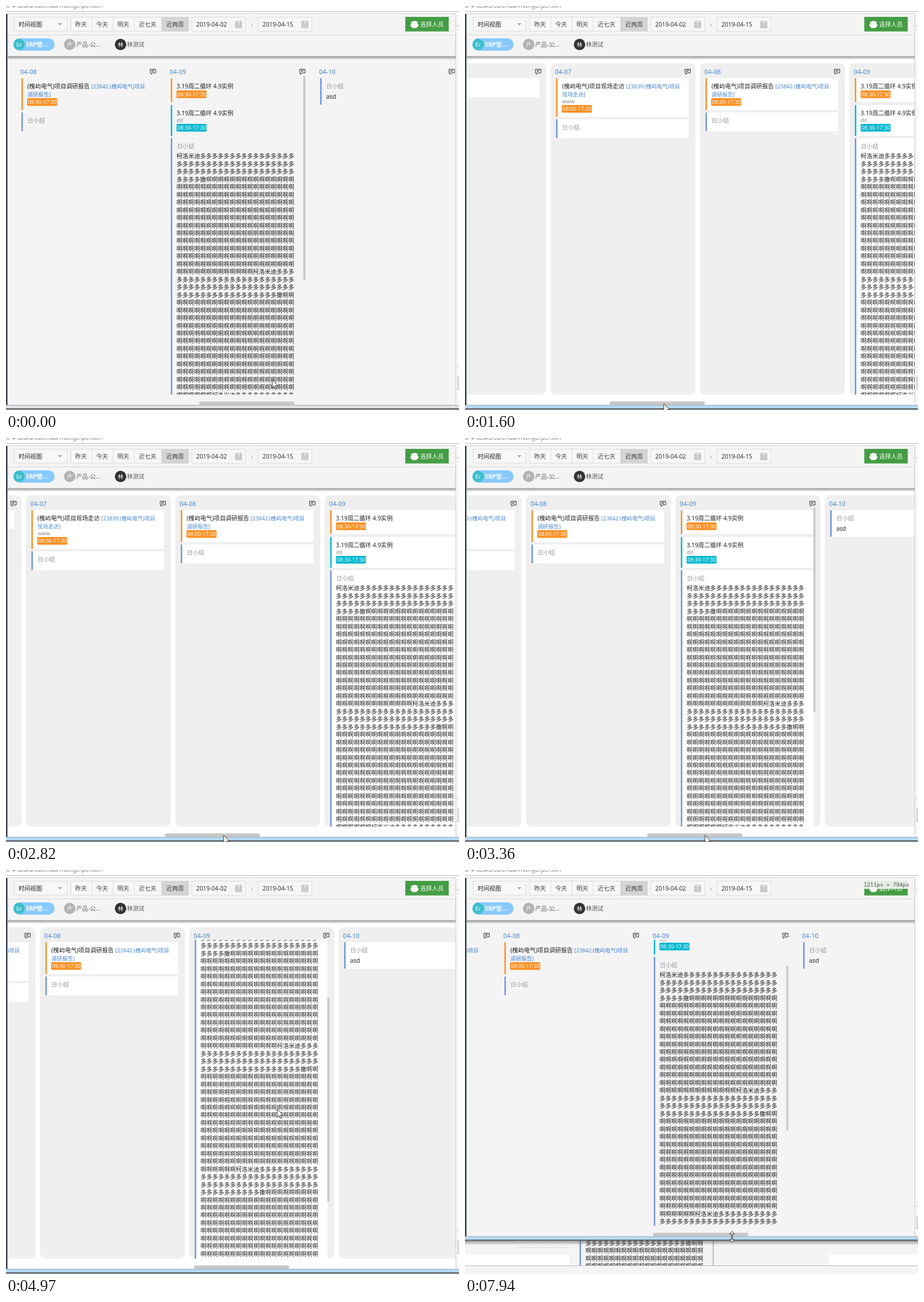
An HTML page that plays this animation: 793x706 px, repeating every 8 s.

```html
<!DOCTYPE html>
<html lang="zh-CN">
<head>
<meta charset="utf-8">
<title>日程视图</title>
<style>
  html, body { margin: 0; width: 100%; height: 100%; overflow: hidden; background: #fff; }
  svg { display: block; --page: #fff; --col: #efefef; --card: #fff; --edge: #b5d8f3; }
  svg.flat { --page: #f4f4f4; --col: #f4f4f4; --card: #f4f4f4; }
  svg.idle { --edge: #dfe1e3; }
  text { font-family: "Noto Sans", "Noto Sans CJK SC", "Noto Sans CJK JP", sans-serif; white-space: pre; }
  .page { fill: var(--page); }
  .col { fill: var(--col); }
  .card { fill: var(--card); }
  .edge { fill: var(--edge); }
</style>
</head>
<body>
<script>
const W = 793, H = 706, LOOP = 8000;
const SIZE = 10.3, SMALL = 9.4, ROW = 13.46, COL_STEP = 261.5;
const ORANGE = '#fb9023', TEAL = '#00b8cf', BLUE = '#6e96dc', LINK = '#4586d0';

function add(parent, tag, attrs = {}, content) {
  const node = document.createElementNS('http://www.w3.org/2000/svg', tag);
  for (const key in attrs) node.setAttribute(key, attrs[key]);
  if (content !== undefined) node.textContent = content;
  parent.appendChild(node);
  return node;
}
const group = (p, attrs) => add(p, 'g', attrs);
const rect = (p, x, y, width, height, fill, more) =>
  add(p, 'rect', { x, y, width, height, fill, ...more });
const path = (p, d, more) => add(p, 'path', { d, fill: 'none', ...more });
// y is the visual middle of the line
const text = (p, x, y, str, fill = '#222', size = SIZE, more) =>
  add(p, 'text', { x, y: y + size * 0.38, fill, 'font-size': size, ...more }, str);
const move = (node, x, y) => node.setAttribute('transform', `translate(${x} ${y})`);

const svg = add(document.body, 'svg', { width: W, height: H, viewBox: `0 0 ${W} ${H}` });
const defs = add(svg, 'defs');
const clip = (id, x, y, w, h) => rect(add(defs, 'clipPath', { id }), x, y, w, h);
const shade = add(defs, 'linearGradient', { id: 'shade', x2: 0, y2: 1 });
add(shade, 'stop', { offset: 0, 'stop-color': '#555', 'stop-opacity': 0.6 });
add(shade, 'stop', { offset: 1, 'stop-color': '#555', 'stop-opacity': 0 });

// Long repeating note, wrapped at 20 characters
const unit = '柯洛米迪' + '多'.repeat(60) + '撒' + '啊'.repeat(248);
const note = unit.repeat(4).slice(0, 1080);
function noteRows(p, x, y, first, count) {
  for (let i = 0; i < count; i++) {
    const from = (first + i) * 20;
    text(p, x, y + i * ROW, note.slice(from, from + 20));
  }
}

function drawBehind() {
  const g = group(svg);
  rect(g, 0, 600, W, 106, '#f4f4f4');
  rect(g, 0, 672, 183, 19, '#fff');
  rect(g, 637, 672, 156, 19, '#fff');
  rect(g, 93, 659, 90, 1, '#ddd');
  clip('behind', 190, 600, 260, 91);
  const c = group(g, { 'clip-path': 'url(#behind)' });
  rect(c, 200.5, 600, 2.5, 91, BLUE);
  rect(c, 433, 600, 3, 91, '#ccc');
  noteRows(c, 211, 652, 18, 4);
  rect(g, 0, 691, W, 1, '#bdbdbd');
}

function card(p, y, h, color) {
  rect(p, 3, y, 231, h, null, { class: 'card' });
  rect(p, 2, y, 2.5, h, color, { rx: 1 });
}
function badge(p, y, str, color) {
  rect(p, 12, y, 52.5, 13.5, color, { rx: 2 });
  text(p, 13.5, y + 6.7, str, '#fff', 9.2);
}
function summary(p, y, h) {
  card(p, y, h, BLUE);
  text(p, 12.5, y + 14, '日小结', '#999', SIZE, { 'font-weight': 500 });
}
function column(index, date) {
  const g = group(columns, { transform: `translate(${index * COL_STEP} 0)` });
  rect(g, -7.5, 100, 253.5, 579, null, { class: 'col', rx: 9 });
  text(g, 0, 115, date, LINK, 11);
  path(g, 'M227.5 110.5h9.5v6.5h-5.5l-2.5 2.5v-2.5h-1.5zM229.5 112.7h5.5M229.5 114.8h4',
    { stroke: '#333' });
  return g;
}
function visit(p, h, name, id, tail) {
  card(p, 126, h, ORANGE);
  const line = text(p, 12.5, 140, '');
  add(line, 'tspan', {}, `(槐屿电气)${name} `);
  add(line, 'tspan', { fill: LINK, 'font-size': SMALL }, `[${id}:(槐屿电气)项目`);
  text(p, 12.5, 154, tail, LINK, SMALL);
}

drawBehind();
const pageBack = rect(svg, 0, 13, W, 684, null, { class: 'page' });
const contentClip = clip('content', 3, 90, 784, 607);
const columns = group(group(svg, { 'clip-path': 'url(#content)' }));

summary(column(-2, '04-06'), 126, 33);

const day7 = column(-1, '04-07');
visit(day7, 68, '项目现场走访', 23839, '现场走访]');
text(day7, 12.5, 166, 'www', '#888', SMALL);
badge(day7, 173, '08:00-17:30', ORANGE);
summary(day7, 198, 33);

const day8 = column(0, '04-08');
visit(day8, 56, '项目调研报告', 23842, '调研报告]');
badge(day8, 161, '08:00-17:30', ORANGE);
summary(day8, 186, 33);

const day9 = column(1, '04-09');
const bodyClip = clip('body', -7.5, 122, 253.5, 557);
const body = group(group(day9, { 'clip-path': 'url(#body)' }));
card(body, 126, 42, ORANGE);
text(body, 12, 140, '3.19周二循环 4.9实例');
badge(body, 147.5, '08:30-17:30', ORANGE);
card(body, 173, 54, TEAL);
text(body, 12, 187, '3.19周二循环 4.9实例');
text(body, 12, 199, 'dd', '#888', SMALL);
badge(body, 206, '08:30-17:30', TEAL);
summary(body, 231, 756);
noteRows(body, 12, 262.5, 0, 53);
const vThumb = rect(day9, 234, 122, 3.5, 357, '#c8c8c8', { rx: 1.5 });

const day10 = column(2, '04-10');
summary(day10, 126, 46.5);
text(day10, 12.5, 158, 'asd');

function drawHeader() {
  const g = group(svg);
  rect(g, 0, 0, W, 13, '#fff');
  text(g, 168, -1, 't/ # tasks/calendarmange/person', '#777', 10.7, { 'text-anchor': 'end' });
  rect(g, 0, 9, W, 1, '#b8b8b8');
  rect(g, 0, 13, 787, 75, '#f4f4f4');
  rect(g, 0, 12.5, 787, 1, '#cfcfcf');
  rect(g, 3, 88, 784, 6, 'url(#shade)');
  rect(g, 3.5, 50.5, 783.5, 37, '#f4f4f4', { stroke: '#d6d6d6' });

  const box = (x, w, fill = '#f7f7f7') => rect(g, x + 0.5, 19.5, w, 24.5, fill, { stroke: '#dcdcdc' });
  box(14, 92);
  text(g, 22, 32, '时间视图');
  path(g, 'M91 30h8l-4 4z', { fill: '#aaa' });
  box(113, 206);
  rect(g, 272, 19, 48, 25.5, '#d4d4d4');
  for (const x of [150, 187, 224]) rect(g, x, 20, 1, 24, '#dedede');
  [[121, '昨天'], [158, '今天'], [195, '明天'], [232.5, '近七天'], [280.5, '近两周']]
    .forEach(([x, str]) => text(g, x, 32, str, '#444'));
  [[325, '2019-04-02'], [441, '2019-04-15']].forEach(([x, str]) => {
    box(x, 94);
    text(g, x + 8, 32, str, '#333');
    path(g, `M${x + 76.5} 27.5h11v10.5h-11zM${x + 76.5} 30.5h11m-11 2.5h11m-11 2.5h11` +
      `M${x + 79.5} 25v13m3 -8v8m3 -13v13`, { stroke: '#aaa', 'stroke-width': 0.9 });
  });
  text(g, 429, 32, '-', '#666');

  rect(g, 699, 19, 76, 25.5, '#449d44');
  for (const [x, y, r] of [[711, 29, 2], [719, 29, 2], [715, 28.5, 2.8]])
    add(g, 'circle', { cx: x, cy: y, r, fill: '#fff' });
  path(g, 'M708 36v-3q0-2 3-2h8q3 0 3 2v3zM710.5 38.5v-3q0-3 3-3h3q3 0 3 3v3z', { fill: '#fff' });
  text(g, 725, 32, '选择人员', '#fff');

  rect(g, 13, 56.5, 72, 21.5, '#88caff', { rx: 10.7 });
  [[23, 'Er', '#3fbfcb', 35, 'ERP管...', '#fff', 700],
   [111.5, '产', '#b2b2b2', 123, '产品-公...', '#666', 400],
   [200.5, '林', '#333', 211.5, '林测试', '#555', 400]]
    .forEach(([cx, mark, color, x, name, ink, weight]) => {
      add(g, 'circle', { cx, cy: 67.2, r: 10, fill: color });
      text(g, cx, 67.2, mark, '#fff', 9.6, { 'text-anchor': 'middle' });
      text(g, x, 67.2, name, ink, SIZE, { 'font-weight': weight });
    });
}
drawHeader();

const leftBar = rect(svg, 0, 14, 2.5, 683, '#2f3a4c');
const gutter = rect(svg, 787, 13, 6, 684, '#f8f8f8');
const gutterLine = rect(svg, 787, 13, 1, 684, '#c9c9c9');
rect(svg, 788, 34, 5, 1, '#ccc');
const gutterItems = group(svg);
rect(gutterItems, 788, 630, 5, 1, '#d5d5d5');
rect(gutterItems, 791, 648.5, 8, 22, '#eee', { stroke: '#aaa' });

const foot = group(svg);
const hThumb = rect(foot, 0, 691, 167, 6, '#c8c8c8', { rx: 3 });
rect(foot, 0, 697, W, 1, '#a9b0b6');
rect(foot, 0, 698, W, 5, null, { class: 'edge' });
rect(foot, 0, 703, W, 1.7, '#4a525a');
rect(foot, 0, 704.7, W, 8, 'url(#shade)');

const sizeTip = group(svg);
rect(sizeTip, 697, 18, 90, 15, '#f1f3f1', { opacity: 0.92 });
const sizeText = text(sizeTip, 698, 25, '', '#555', 9.45);
sizeText.style.fontFamily = '"DejaVu Sans Mono", monospace';

const arrow = path(svg, 'M0 0v14.2l3.3-3 2.3 5.2 2.2-1-2.3-5h4.4z',
  { style: 'fill:#fff;stroke:#222;stroke-width:0.9' });
const resizer = path(svg, 'M0-9.5L4-5H1V5H4L0 9.5-4 5H-1V-5H-4z',
  { style: 'fill:#fff;stroke:#111;stroke-width:0.9' });

// x: column offset, s: column scroll, cx/cy: pointer, d: rise of the window bottom
const initial = { x: 25, s: 0, cx: 466, cy: 653, d: 0 };
// first step, last step, number of steps, values reached
const moves = [
  [120, 394, 3, { cx: 437, cy: 694 }],
  [531, 1080, 5, { x: 290, cx: 378 }],
  [1210, 1600, 4, { x: 419, cx: 348, cy: 695 }],
  [1880, 2120, 3, { x: 450, cx: 341 }],
  [2550, 2820, 3, { x: 304, cx: 381, cy: 694 }],
  [2950, 3480, 5, { x: 67, cx: 430 }],
  [3760, 4000, 3, { cx: 475, cy: 418 }],
  [4270, 4270, 1, { s: 64 }],
  [4405, 4540, 2, { s: 79 }],
  [4970, 4970, 1, { s: 157 }],
  [5110, 5250, 2, { s: 236 }],
  [5390, 5530, 2, { s: 79 }],
  [5670, 5810, 2, { cx: 451, cy: 710 }],
  [6090, 6090, 1, { cy: 714 }],
  [6370, 6520, 2, { cy: 704 }],
  [6990, 7940, 8, { cx: 467.5, cy: 641, d: 57 }]
];

function stateAt(t) {
  const state = { ...initial };
  for (const [start, end, count, goal] of moves) {
    if (t < start) break;
    const gap = count > 1 ? (end - start) / (count - 1) : 1;
    const part = Math.min(count, Math.floor((t - start) / gap + 1e-6) + 1) / count;
    for (const key in goal) state[key] += (goal[key] - state[key]) * part;
  }
  return state;
}

function render(t) {
  const { x, s, cx, cy, d } = stateAt(t);
  const dragging = t >= 6990, view = 557 - d;
  svg.classList.toggle('flat', t < 120 || dragging);
  svg.classList.toggle('idle', t < 120);

  move(columns, x, 0);
  move(body, 0, -s);
  for (const [node, height] of [[pageBack, 684], [contentClip, 607], [bodyClip, 557],
    [leftBar, 683], [gutter, 684], [gutterLine, 684]])
    node.setAttribute('height', height - d);
  vThumb.setAttribute('y', 122 + s * view / 869);
  vThumb.setAttribute('height', view * view / 869);
  hThumb.setAttribute('x', 338 - (x - 25) / 4.635);
  move(foot, 0, -d);
  move(gutterItems, 0, -d * 0.77);

  sizeTip.style.display = dragging ? '' : 'none';
  sizeText.textContent = `1211px × ${794 + Math.round((57 - d) / 0.858)}px`;
  arrow.style.display = t < 6090 ? '' : 'none';
  resizer.style.display = t < 6090 ? 'none' : '';
  move(arrow, cx, cy);
  move(resizer, cx, cy);
}

const begin = performance.now();
function tick() {
  render((performance.now() - begin) % LOOP);
  requestAnimationFrame(tick);
}
render(0);
requestAnimationFrame(tick);
</script>
</body>
</html>
```
